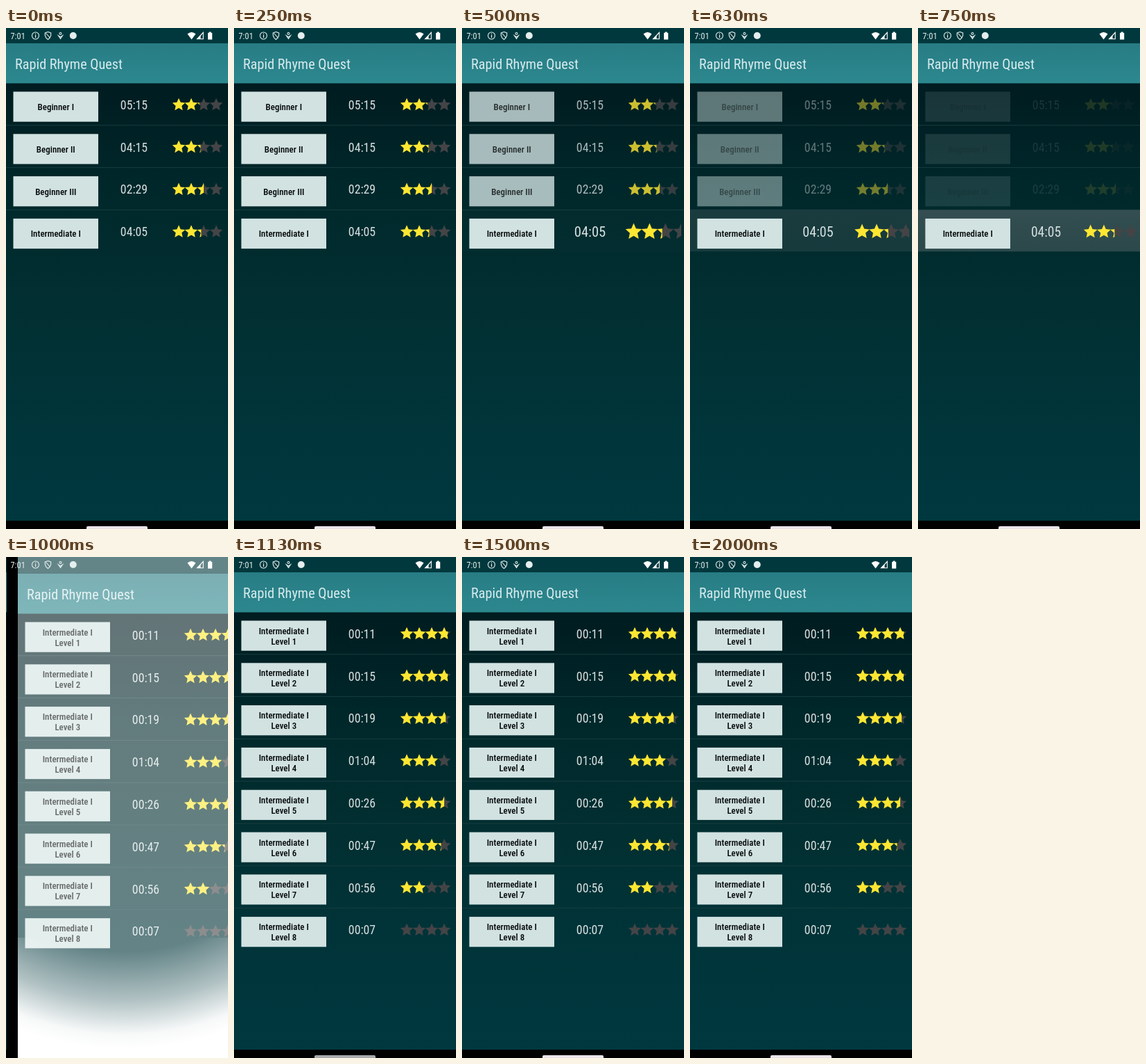
An HTML page with a canvas for the animation above (2130 ms loop, 320 by 720 pixels).

```html
<!DOCTYPE html>
<html lang="en">
<head>
<meta charset="utf-8">
<title>Word game levels</title>
<style>
html, body { margin: 0; width: 100%; height: 100%; overflow: hidden; background: #000; }
canvas { display: block; width: 320px; height: 720px; }
</style>
</head>
<body>
<canvas id="stage" width="320" height="720"></canvas>
<script>
const W = 320, H = 720, LOOP = 2130, PITCH = 60.8;
const FACE = '"Roboto Condensed", Roboto, sans-serif';
const TITLE = 'Rapid Rhyme Quest';
const canvas = document.getElementById('stage');
const dpr = window.devicePixelRatio || 1;
canvas.width = W * dpr;
canvas.height = H * dpr;
const c = canvas.getContext('2d');

const groups = [
  ['Beginner I', '05:15', 2.15], ['Beginner II', '04:15', 2.25],
  ['Beginner III', '02:29', 2.5], ['Intermediate I', '04:05', 2.3]
];
const levels = [
  ['00:11', 3.8], ['00:15', 3.78], ['00:19', 3.62], ['01:04', 3],
  ['00:26', 3.5], ['00:47', 3.25], ['00:56', 2], ['00:07', 0]
].map(([time, score], i) => ['Intermediate I|Level ' + (i + 1), time, score]);

// One pose per tick, from the tap to the end of the slide.
const TAP = 4;
const poses = [
  { rows: .8, glow: .05, size: 17.8 * 1.16, starX: 236, star: 22.9, x: W + 16 },
  { rows: .45, glow: .5, size: 17.8 * 1.13, starX: 237.5, star: 21, x: W + 16 },
  { rows: .12, glow: 1, size: 17.8 * 1.1, starX: 239, star: 19.3, x: W + 16 },
  { rows: .02, glow: .4, size: 17.8, starX: 240, star: 18.2, x: 197 },
  { rows: 0, glow: .3, size: 17.8, starX: 240, star: 18, x: 17 }
];
const idle = { rows: 1, glow: 0, size: 17.8, starX: 240, star: 18, x: W + 16 };

function rect(x, y, w, h, fill) {
  c.fillStyle = fill;
  c.fillRect(x, y, w, h);
}

function text(str, x, y, size, fill, align = 'left', weight = 400) {
  c.font = `${weight} condensed ${size}px ${FACE}`;
  c.font = c.font.includes(size) ? c.font : `${weight} ${size}px ${FACE}`;
  c.fillStyle = fill;
  c.textAlign = align;
  c.fillText(str, x, y);
}

function vertical(y0, y1, ...colors) {
  const g = c.createLinearGradient(0, y0, 0, y1);
  colors.forEach((col, i) => g.addColorStop(i / (colors.length - 1), col));
  return g;
}

function starPath(cx, cy, r) {
  c.beginPath();
  for (let i = 0; i < 10; i++) {
    const a = -Math.PI / 2 + i * Math.PI / 5, d = i % 2 ? r * .47 : r;
    c.lineTo(cx + d * Math.cos(a), cy + d * Math.sin(a));
  }
  c.closePath();
}

function stars(x, y, size, score) {
  const part = (from, to, fill) => {
    c.save();
    c.beginPath();
    c.rect(from, y - 20, Math.max(0, to - from), 40);
    c.clip();
    c.fillStyle = fill;
    for (let i = 0; i < 4; i++) {
      starPath(x + (i + .5) * size, y + .5, size * .54);
      c.fill();
    }
    c.restore();
  };
  const split = x + score * size;
  part(split, 316, '#444446');
  part(x - 2, split, '#ffe632');
}

function row(item, i, p = idle) {
  const y = 79 + i * PITCH;
  const [label, time, score] = item;
  rect(10.5, y + 12.5, 122.5, 43.2, '#d1e2e1');
  const lines = label.split('|');
  lines.forEach((s, k) =>
    text(s, 71.8, y + 39 + (k - (lines.length - 1) / 2) * 15, 13, '#050808', 'center', 500));
  text(time, 184.5, y + 37.8 + (p.size - idle.size) * .35, p.size, '#d5e0e1', 'center');
  stars(p.starX, y + 31, p.star, score);
}

function page(count) {
  rect(0, 0, W, 22, '#00383d');
  rect(0, 79, W, 629, vertical(79, 708, '#001c20', '#00282b', '#022f31', '#003439', '#00383f'));
  rect(0, 22, W, 57.5, vertical(22, 79, '#287c84', '#2c888e'));
  text(TITLE, 13, 59, 20.3, '#d6eaec');
  rect(0, 708, W, 12, '#000');
  for (let i = 1; i < count; i++) rect(0, 79 + i * PITCH - .5, W, 1, '#173c40');
}

function glow(p) {
  if (!p.glow) return;
  const y = 79 + 3 * PITCH;
  c.save();
  c.globalAlpha = p.glow;
  rect(0, y, W, PITCH - 1, vertical(y, y + PITCH, '#344e51', '#2b484b'));
  c.restore();
}

function groupPage(p) {
  page(groups.length);
  glow(p);
  groups.forEach((g, i) => {
    c.globalAlpha = i < 3 ? p.rows : 1;
    row(g, i, i < 3 ? idle : p);
  });
  c.globalAlpha = 1;
}

function levelPage() {
  page(levels.length);
  levels.forEach((l, i) => row(l, i));
}

// White veil that clears from the upper middle outwards.
function veil() {
  rect(0, -2, W, H, 'rgba(255,255,255,.39)');
  const g = c.createRadialGradient(153, 280, 285, 153, 280, 425);
  g.addColorStop(0, 'rgba(255,255,255,0)');
  g.addColorStop(.5, 'rgba(255,255,255,.5)');
  g.addColorStop(.85, 'rgba(255,255,255,.95)');
  g.addColorStop(1, '#fff');
  rect(0, 545, W, H - 545, g);
}

function shape(points, fill) {
  c.beginPath();
  points.forEach(([x, y]) => c.lineTo(x, y));
  c.closePath();
  fill ? c.fill() : c.stroke();
}

function dot(x, y, r, fill) {
  c.beginPath();
  c.arc(x, y, r, 0, 2 * Math.PI);
  fill ? c.fill() : c.stroke();
}

function statusBar(left, right) {
  text('7:01', 6.5, 15.5, 12.4, left);
  c.strokeStyle = c.fillStyle = left;
  c.lineWidth = 1.1;
  dot(42.5, 11, 5);
  c.fillRect(42, 10, 1.2, 4);
  c.fillRect(42, 7.8, 1.2, 1.3);
  shape([[60.5, 5.5], [64.8, 7.2], [64.6, 11], [63, 14.5], [60.5, 16.5],
    [58, 14.5], [56.4, 11], [56.2, 7.2]]);
  shape([[57.5, 7.5], [63.3, 14]]);
  dot(78.5, 8, 1.5);
  shape([[75.5, 11], [78.5, 13], [81.5, 11], [78.5, 15.5]]);
  dot(96.8, 11, 5, true);

  c.strokeStyle = c.fillStyle = right;
  c.beginPath();
  c.moveTo(267.5, 16.5);
  c.lineTo(261.5, 8.5);
  c.quadraticCurveTo(267.5, 3.5, 273.5, 8.5);
  c.closePath();
  c.fill();
  shape([[275.5, 15.8], [284.3, 15.8], [284.3, 6.5]]);
  shape([[275.5, 15.8], [280.5, 15.8], [280.5, 10.6]], true);
  c.fillRect(291, 7, 6.2, 9.6);
  c.fillRect(292.6, 5.6, 3, 1.6);
}

function pill(fill) {
  c.fillStyle = fill;
  c.beginPath();
  c.roundRect(116, 716, 88, 8, 2);
  c.fill();
}

function shifted(x, y, paint) {
  c.save();
  c.translate(x, y);
  paint();
  c.restore();
}

// Ticks of 125 ms, rounded to whole hundredths of a second.
function tickAt(t) {
  const n = Math.floor(t / 125);
  return t < Math.round(n * 12.5) * 10 ? n - 1 : n;
}

function draw(t) {
  const n = tickAt(t);
  const slide = n - TAP;
  c.setTransform(dpr, 0, 0, dpr, 0, 0);
  rect(0, 0, W, H, '#000');
  let left = '#e4eeee', right = '#fff', bar = '#ebe4eb';
  if (slide >= poses.length) {
    levelPage();
    if (slide === poses.length) bar = '#a9aaac';
  } else {
    const p = poses[slide] || idle;
    shifted(p.x - W - 16, 0, () => groupPage(p));
    if (slide === 3) {
      rect(p.x - 16, 0, 16, H, '#000');
      rect(0, 708, p.x, 12, '#000');
      pill('#f6f2f6');
      rect(p.x, 0, W - p.x, H, '#fdfdfd');
      left = '#8b9c9e';
      right = '#bdbdbd';
      bar = null;
    } else if (slide === 4) {
      shifted(p.x, 2, () => {
        rect(0, -2, W, 2, '#00383d');
        levelPage();
        veil();
      });
      bar = null;
    }
  }
  statusBar(left, right);
  if (bar) pill(bar);
}

const start = performance.now();
function frame(now) {
  draw(Math.max(0, now - start) % LOOP);
  requestAnimationFrame(frame);
}
draw(0);
requestAnimationFrame(frame);
</script>
</body>
</html>
```
